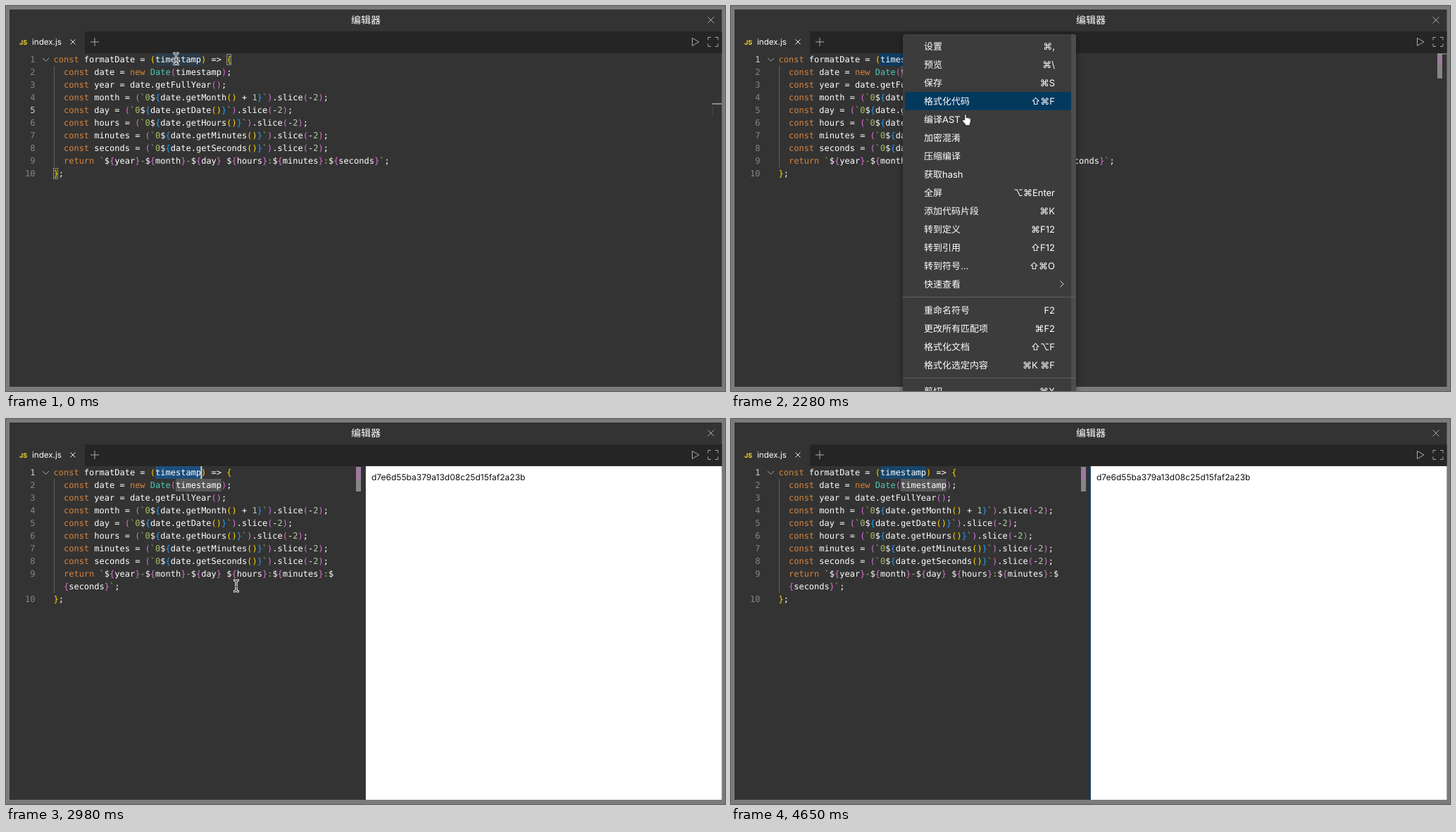
An HTML page for the animation above (4.68 s loop, 1021x547 px).

```html
<!DOCTYPE html>
<html lang="zh-CN">
<head>
<meta charset="utf-8">
<style>
html, body { margin: 0; width: 100%; height: 100%; overflow: hidden; background: #7b7b7b; }
svg { display: block; text-rendering: geometricPrecision; }
text { white-space: pre; font: 13px Inter, "Noto Sans CJK SC", "Noto Sans CJK", "DejaVu Sans", sans-serif; fill: #fff; }
.code text { font: 12px "DejaVu Sans Mono", monospace; }
.end { text-anchor: end; }
.line { fill: none; stroke: #a9a9a9; }
</style>
</head>
<body>
<svg width="1021" height="547" viewBox="0 0 1021 547">
  <rect x="5" y="5" width="1011.5" height="536" fill="#333"/>
  <rect x="5" y="36" width="1011.5" height="31" fill="#252525"/>
  <rect x="5" y="36" width="107" height="31" fill="#333"/>
  <text x="511" y="25" text-anchor="middle" style="font-size:14px;font-weight:500">编辑器</text>
  <text x="19" y="55" style="font-size:9px;font-weight:700;fill:#f0d92f">JS</text>
  <text x="37" y="55" style="font-size:11.6px">index.js</text>
  <path class="line" d="M996.5 15.500l9 9m0-9l-9 9M120 51h12m-6-6v12M974.500 45.500v11l9.500-5.500zM997 48.500v-4h4m6 0h4v4m0 5v4h-4m-6 0h-4v-4"/>
  <path class="line" style="stroke:#eee" d="M91.500 47.500l7 7m0-7l-7 7"/>
  <path class="line" d="M52 74l4.500 4.500 4.500-4.500"/>

  <g id="start">
    <g fill="#35402f" stroke="#888"><rect x="313.500" y="68.500" width="6" height="15"/><rect x="67.500" y="230.500" width="6" height="15"/></g>
    <path class="line" stroke-width="1.500" d="M1003 139h13.500"/>
    <path class="line" style="stroke:#444" d="M1003.500 141v16"/>
  </g>
  <rect id="sel" x="212" y="67" width="65" height="18"/>
  <rect id="match" x="240.900" y="85" width="65" height="18" fill="#575757"/>
  <g id="wide" class="code"></g>
  <g id="narrow" class="code"></g>
  <rect id="caret" x="276.500" y="67" width="1.800" height="18" fill="#ddd"/>
  <g id="ruler">
    <rect id="slider" x="1003" y="68" width="7" height="35" fill="#858585"/>
    <rect id="mark" x="1003" y="68" width="7" height="18" fill="#9d7a9f"/>
  </g>
  <path id="lineMark" class="line" d="M1003 68h13.500"/>

  <g id="panel">
    <rect x="510" y="67" width="1" height="474" fill="#145488"/>
    <rect x="511" y="67" width="505.500" height="474" fill="#fff"/>
    <text x="519" y="87" style="font-size:12px;fill:#111">d7e6d55ba379a13d08c25d15faf2a23b</text>
  </g>

  <g id="menu">
    <rect x="244" y="40" width="246" height="530" rx="4" fill="#3c3c3c" style="filter:drop-shadow(0 2px 4px rgba(0,0,0,.4))"/>
    <path d="M483 40h3q4 0 4 4v506h-7z" fill="#4d4d4d"/>
    <rect id="hover" x="247" width="236" height="26" fill="#04395e"/>
    <path class="line" style="stroke:#606060" d="M244 413.500h246M244 528.500h246"/>
    <path class="line" style="stroke:#ddd" d="M467.500 390.500l4.500 4.500-4.500 4.500"/>
    <g id="items"></g>
  </g>

  <g id="pointer">
    <g id="ibeam" fill="none">
      <path stroke="#fff" stroke-width="3.200" d="M-4-8q4 0 4 3q0-3 4-3M0-5V5M-4 8q4 0 4-3q0 3 4 3M-2 1h4"/>
      <path stroke="#222" stroke-width="1.100" d="M-3.500-8q3.500 0 3.500 3q0-3 3.500-3M0-5V5M-3.500 8q3.500 0 3.500-3q0 3 3.500 3M-2 1h4"/>
    </g>
    <path id="hand" fill="#fff" stroke="#111" stroke-width=".9" d="M-1.200 8V.8Q0-.8 1.200.8V5Q2.400 4 3.400 5.200Q4.800 4.400 5.600 5.800Q7.400 5.400 7.600 7V10.500L6.400 13V16H-.6V14L-4.600 9.600Q-5 7.400-3 8Z"/>
    <path id="arrow" fill="#111" stroke="#fff" d="M0 0V15L3.500 11.800L6 17.500L8.500 16.500L6 11H11Z"/>
  </g>
</svg>
<script>
const LOOP = 4680;
const el = {};
document.querySelectorAll("[id]").forEach(e => el[e.id] = e);

const head = [
  "const formatDate = (timestamp) => {",
  "  const date = new Date(timestamp);",
  "  const year = date.getFullYear();",
  "  const month = (`0${date.getMonth() + 1}`).slice(-2);",
  "  const day = (`0${date.getDate()}`).slice(-2);",
  "  const hours = (`0${date.getHours()}`).slice(-2);",
  "  const minutes = (`0${date.getMinutes()}`).slice(-2);",
  "  const seconds = (`0${date.getSeconds()}`).slice(-2);"
];
const result = "  return `${year}-${month}-${day} ${hours}:${minutes}:${seconds}`;";
const cut = result.indexOf("{seconds");

// Colours tokens; bracket colour follows nesting depth.
function highlighter() {
  const levels = ["#ffd700", "#da70d6", "#179fff"];
  let depth = 0, inString = false, hole = false;
  function colour(s) {
    if (s === "`") { inString = !inString; return "#a5c261"; }
    if (s === "(" || s === "{") {
      if (s === "{" && inString) hole = true;
      return levels[depth++ % 3];
    }
    if (s === ")" || s === "}") {
      if (s === "}") hole = false;
      return levels[--depth % 3];
    }
    if (s === "$") return "#fff";
    if (inString && !hole) return "#a5c261";
    if (/^(const|new|return)$/.test(s)) return "#d8843b";
    if (s === "Date") return "#4ec9b0";
    return /^\d/.test(s) ? "#b5cea8" : "#fff";
  }
  return row => row.replace(/\w+|\s+|[^\w\s]/g,
    s => `<tspan fill="${colour(s)}">${s === ">" ? "&gt;" : s}</tspan>`);
}

function codeBlock(rows, guideEnd) {
  const paint = highlighter();
  let n = 0;
  return `<path d="M68.500 85V${guideEnd}" stroke="#606060"/>` + rows.map((row, i) => {
    const y = 80 + i * 18;
    const wrapped = row.startsWith("  {");
    const num = wrapped ? "" : `<text class="end num" x="41.500" y="${y}">${++n}</text>`;
    return `${num}<text x="67.500" y="${y}">${paint(row)}</text>`;
  }).join("");
}
el.wide.innerHTML = codeBlock([...head, result, "};"], 229);
el.narrow.innerHTML = codeBlock([...head, result.slice(0, cut), "  " + result.slice(cut), "};"], 247);
const nums = [...document.querySelectorAll(".num")];

const items = [
  "设置|⌘,", "预览|⌘\\", "保存|⌘S", "格式化代码|⇧⌘F", "编译AST|", "加密混淆|", "压缩编译|",
  "获取hash|", "全屏|⌥⌘Enter", "添加代码片段|⌘K", "转到定义|⌘F12", "转到引用|⇧F12",
  "转到符号...|⇧⌘O", "快速查看|", "重命名符号|F2", "更改所有匹配项|⌘F2", "格式化文档|⇧⌥F",
  "格式化选定内容|⌘K ⌘F", "剪切|⌘X"
];
el.items.innerHTML = items.map((item, i) => {
  const [label, keys] = item.split("|");
  const y = 62 + i * 26 + (i > 13) * 11 + (i > 17) * 11;
  return `<text x="274" y="${y}">${label}</text><text class="end" x="460" y="${y}">${keys}</text>`;
}).join("");

// Pointer hot spot: time, x, y
const path = [
  [0, 241.5, 75], [1320, 241.5, 75], [1560, 245, 75], [1820, 245, 75], [2280, 333, 153.5],
  [2340, 332, 174], [2370, 332, 174], [2830, 327, 237], [3010, 327, 237], [3040, 328, 237],
  [3550, 328, 237], [3730, 891, 474], [3940, 891, 474], [4300, 952, 552], [LOOP, 952, 552]
];
function pointerAt(t) {
  const i = path.findIndex(p => p[0] > t);
  const [t0, x0, y0] = path[i - 1], [t1, x1, y1] = path[i];
  const k = (t - t0) / (t1 - t0);
  return [x0 + (x1 - x0) * k, y0 + (y1 - y0) * k];
}

const ramp = (t, from, to) => Math.min(1, Math.max(0, (t - from) / (to - from)));
const show = (e, on) => e.style.display = on ? "" : "none";

function draw(t) {
  const clicked = t >= 500, matched = t >= 970;
  const menu = t >= 1320 && t < 2920, panel = t >= 2980;
  const [x, y] = pointerAt(t);

  show(el.start, !clicked);
  show(el.match, matched);
  show(el.mark, matched);
  show(el.wide, !panel);
  show(el.narrow, panel);
  show(el.panel, panel);
  show(el.menu, menu);
  show(el.lineMark, menu);
  nums.forEach(n => n.style.fill = n.textContent === (clicked ? "1" : "5") ? "#d0d0d0" : "#858585");

  el.sel.setAttribute("fill", menu ? "#0d3d63" : t >= 4600 ? "#17466b" : "#1c4f7c");
  el.sel.setAttribute("opacity", clicked ? 0.5 + 0.5 * ramp(t, 500, 730) : 0.3);
  el.slider.setAttribute("opacity", ramp(t, 480, 730));
  el.ruler.setAttribute("transform", `translate(${panel ? -506 : 0})`);
  el.caret.setAttribute("opacity", clicked ?
    1 - ramp(t, 3570, 3650) + ramp(t, 4070, 4150) - ramp(t, 4590, 4650) : 0);

  const [hx, hy] = pointerAt(Math.max(0, t - 50));
  show(el.hover, hx > 250);
  el.hover.setAttribute("y", 44 + Math.floor((hy - 44) / 26) * 26);

  const hand = t > 1840 && menu, arrow = x > 511;
  show(el.hand, hand);
  show(el.arrow, arrow);
  show(el.ibeam, !hand && !arrow);
  el.pointer.setAttribute("transform", `translate(${x} ${y})`);
}

const began = performance.now();
function tick() {
  draw((performance.now() - began) % LOOP);
  requestAnimationFrame(tick);
}
tick();
</script>
</body>
</html>
```
